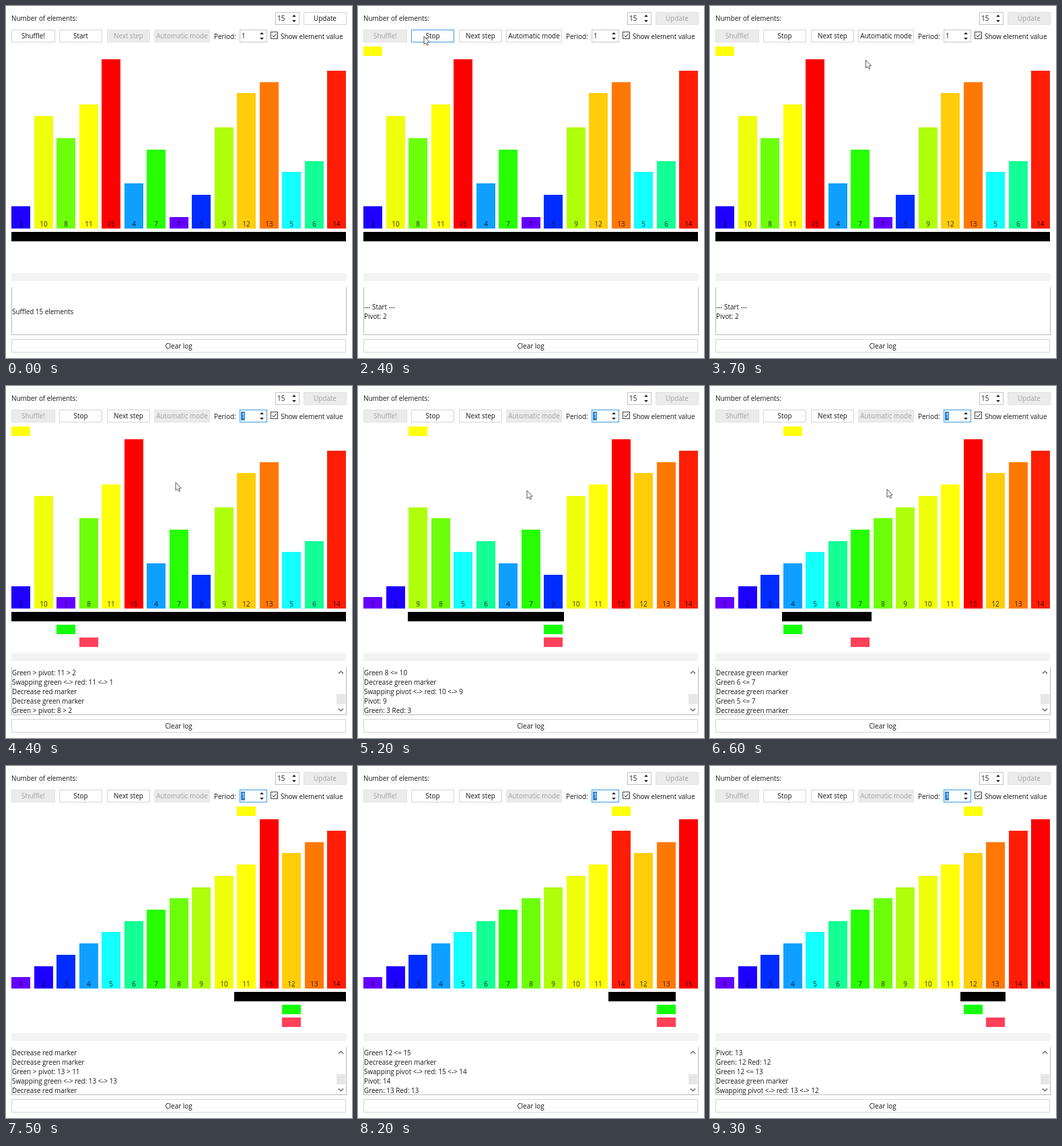
An HTML page with a canvas that plays this animation: 514x522 px, repeating every 9.4 s.

```html
<!DOCTYPE html>
<html lang="en">
<head>
<meta charset="utf-8">
<title>Quicksort steps</title>
<style>
  html, body { margin: 0; width: 100%; height: 100%; overflow: hidden; background: #fff; }
  canvas { display: block; width: 514px; height: 522px; }
</style>
</head>
<body>
<canvas id="stage" width="514" height="522"></canvas>
<script>
const ctx = document.getElementById('stage').getContext('2d');
const LOOP = 9400, TICK = 100;
const START = 2400, AUTO = 3850, DONE = 8500;
const BLUE = '#3a9bd8', INK = '#161616';
const VALUES = [2, 10, 8, 11, 15, 4, 7, 1, 3, 9, 12, 13, 5, 6, 14];
const COLORS = ['#6400ff', '#1e00ff', '#002dff', '#0fa0ff', '#14ffff', '#14ff96', '#28ff00', '#6eff0a',
  '#afff0a', '#f0ff0a', '#ffff0a', '#ffcd0a', '#ff7805', '#ff1e05', '#ff0000'];

// Time to step count; each step gets slower as the log grows.
const PACE = [[START, 1], [AUTO, 1], [4110, 25], [4400, 50], [4755, 73], [5200, 97],
  [5835, 124], [6600, 152], [7500, 180], [DONE, 210]];
const POINTER = [[1500, 256, 4], [1700, 190, 28], [2000, 98, 45], [2500, 98, 45], [2900, 126, 112],
  [3300, 178, 146], [3500, 184, 148], [3800, 255, 46], [4000, 255, 46], [4400, 252, 143],
  [5200, 251, 155], [6600, 263, 153], [6900, 285, 300], [7000, 300, 492]];

function along(keys, t) {
  if (t <= keys[0][0]) return keys[0].slice(1);
  for (let i = 1; i < keys.length; i++) {
    const [a, ...from] = keys[i - 1], [b, ...to] = keys[i];
    if (t <= b) return from.map((v, k) => v + (to[k] - v) * (t - a) / (b - a));
  }
  return keys[keys.length - 1].slice(1);
}

function record(values) {
  const list = [...values], steps = [];
  const mark = { lo: 0, hi: list.length - 1, pivot: -1, green: -1, red: -1 };
  const log = text => steps.push({ ...mark, text, list: [...list] });
  const swap = (a, b) => { [list[a], list[b]] = [list[b], list[a]]; };

  function sort(lo, hi) {
    if (lo >= hi) return;
    Object.assign(mark, { lo, hi, pivot: lo });
    const p = list[lo];
    log(`Pivot: ${p}`);
    mark.green = mark.red = hi;
    log(`Green: ${list[hi]} Red: ${list[hi]}`);
    while (mark.green > lo) {
      const g = list[mark.green], r = list[mark.red];
      if (g > p) {
        log(`Green > pivot: ${g} > ${p}`);
        swap(mark.green, mark.red);
        log(`Swapping green <-> red: ${g} <-> ${r}`);
        mark.red--;
        log('Decrease red marker');
      } else {
        log(`Green ${g} <= ${p}`);
      }
      mark.green--;
      log('Decrease green marker');
    }
    const mid = mark.red, r = list[mid];
    swap(lo, mid);
    log(`Swapping pivot <-> red: ${p} <-> ${r}`);
    sort(lo, mid - 1);
    sort(mid + 1, hi);
  }

  log('--- Start ---');
  sort(0, list.length - 1);
  return steps;
}
const steps = record(VALUES);
const idle = { ...steps[0], text: 'Suffled 15 elements' };

function rect(x, y, w, h, color) {
  ctx.fillStyle = color;
  ctx.fillRect(x, y, w, h);
}

function frame(x, y, w, h, color) {
  ctx.strokeStyle = color;
  ctx.lineWidth = 1;
  ctx.strokeRect(x + .5, y + .5, w - 1, h - 1);
}

function label(text, x, y, color = INK, align = 'left') {
  ctx.fillStyle = color;
  ctx.textAlign = align;
  ctx.fillText(text, x, y + 3.6);
}

function path(points) {
  ctx.beginPath();
  points.forEach(([x, y]) => ctx.lineTo(x, y));
}

function button(text, x, y, w, h, enabled, mouse) {
  const hover = enabled && mouse && mouse[0] > x && mouse[0] < x + w && mouse[1] > y && mouse[1] < y + h;
  rect(x, y, w, h, enabled ? '#fefefe' : '#ebebeb');
  frame(x, y, w, h, hover ? BLUE : enabled ? '#d4d4d4' : '#e2e2e2');
  label(text, x + w / 2, y + h / 2, enabled ? INK : '#a2a2a2', 'center');
}

function spinner(text, x, y, w, focus) {
  frame(x, y, w, 19, focus ? BLUE : '#c4c4c4');
  if (focus) rect(x + 2, y + 3, 6, 13, '#2e86d0');
  label(text, x + 3, y + 9.5, focus ? '#fff' : INK);
  const cx = x + w - 8, cy = y + 9.5;
  ctx.fillStyle = '#111';
  for (const d of [-1, 1]) {
    path([[cx - 2.8, cy + d * 2.5], [cx + 2.8, cy + d * 2.5], [cx, cy + d * 5.5]]);
    ctx.fill();
  }
}

function drawControls(t, mouse) {
  const running = t >= START, auto = t >= AUTO;
  label('Number of elements:', 8, 18.5);
  spinner('15', 400, 9, 36, false);
  button('Update', 442, 9, 64, 19, !running, mouse);
  button('Shuffle!', 8, 35, 65, 19, !running, mouse);
  button(running ? 'Stop' : 'Start', 79, 35, 64, 19, true, mouse);
  button('Next step', 150, 35, 64, 19, running, mouse);
  button('Automatic mode', 220, 35, 83, 19, running && !auto, mouse);
  label('Period:', 309, 45);
  spinner('1', 347, 35, 41, auto);
  frame(393, 38, 11, 11, '#444');
  path([[395.5, 43.5], [397.8, 46], [401.7, 40.8]]);
  ctx.strokeStyle = '#222';
  ctx.stroke();
  label('Show element value', 408, 45);
}

function drawChart(s) {
  const column = i => Math.round(8 + 33.5 * i);
  const marker = (i, y, color) => { if (i >= 0) rect(column(i), y, 28, 14, color); };
  s.list.forEach((v, i) => {
    const top = Math.round(330 - 16.72 * v);
    rect(column(i), top, 28, 330 - top, COLORS[v - 1]);
    label(v, column(i) + 14, 323.5, 'rgba(0,0,0,.8)', 'center');
  });
  const edge = i => Math.round(8 + 33.13 * i);
  rect(edge(s.lo), 335, edge(s.hi + 1) - edge(s.lo), 14, '#000');
  marker(s.pivot, 60, '#ffff0a');
  marker(s.green, 354, '#14ff0a');
  marker(s.red, 373, '#ff4059');
}

function drawLog(lines, total) {
  rect(8, 396, 497, 12, '#f3f3f3');
  rect(8, 417, 1, 71, '#b8b8b8');
  rect(505, 417, 1, 71, '#b8b8b8');
  rect(8, 487, 498, 1, '#b8b8b8');
  lines.forEach((text, i) => label(text, 9, 453 + (i - (lines.length - 1) / 2) * 14));
  if (total <= 5) return;
  const h = Math.max(15, 200 / total);
  rect(491, 472 - h, 13, h, '#e6e6e6');
  ctx.strokeStyle = '#555';
  ctx.lineWidth = 1.2;
  for (const [y, d] of [[425, -1], [480, 1]]) {
    path([[494, y - d * 1.5], [497.5, y + d * 2], [501, y - d * 1.5]]);
    ctx.stroke();
  }
}

function drawPointer([x, y]) {
  path([[0, 0], [0, 12], [2.8, 9.6], [4.7, 13.4], [6.5, 12.6], [4.8, 8.9], [8.2, 8.7]]
    .map(([dx, dy]) => [x + dx, y + dy]));
  ctx.closePath();
  ctx.fillStyle = '#fff';
  ctx.fill();
  ctx.strokeStyle = '#444';
  ctx.lineWidth = .9;
  ctx.stroke();
}

function draw(t) {
  const mouse = t >= 1500 && t <= 7000 ? along(POINTER, t) : null;
  const n = Math.min(steps.length - 1, Math.floor(along(PACE, t)[0] + 1e-6));
  const state = t < START ? idle : steps[n];
  // The log view trails by one line while steps keep coming.
  const last = n > 5 && t < DONE ? n - 1 : n;
  const lines = t < START ? [idle.text]
    : steps.slice(Math.max(0, last - 4), last + 1).map(s => s.text);

  rect(0, 0, 514, 522, '#fff');
  ctx.font = '9.9px "Open Sans", "Noto Sans", sans-serif';
  drawControls(t, mouse);
  drawChart(state);
  drawLog(lines, t < START ? 1 : last + 1);
  button('Clear log', 8, 494, 497, 20, true, mouse);
  if (mouse) drawPointer(mouse);
}

const begin = performance.now();
function loop() {
  const t = (performance.now() - begin) % LOOP;
  draw(Math.floor(t / TICK) * TICK);
  requestAnimationFrame(loop);
}
loop();
</script>
</body>
</html>
```
